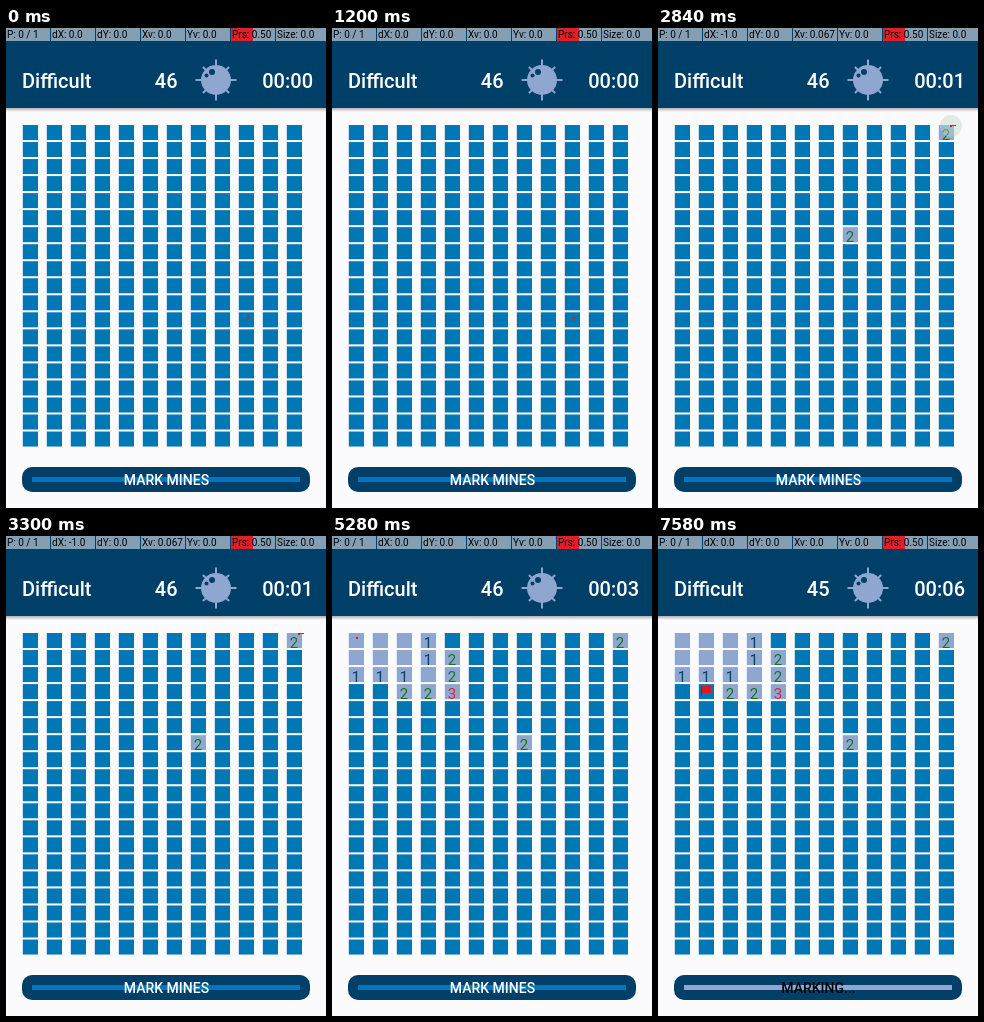
An HTML page with a canvas for the animation above (8000 ms loop, 320 by 480 pixels).

```html
<!DOCTYPE html>
<html lang="en">
<head>
<meta charset="utf-8">
<title>Mine field</title>
<style>
html, body { margin: 0; width: 100%; height: 100%; overflow: hidden; background: #fbfbfd; }
canvas { display: block; width: 100%; height: 100%; }
</style>
</head>
<body>
<canvas id="stage" width="320" height="480"></canvas>
<script>
const ctx = document.getElementById('stage').getContext('2d');
const LOOP = 8000, COLS = 12, ROWS = 19;
const NAVY = '#004068', BLUE = '#0277b5', GRAY = '#8fa6d0', PAPER = '#fbfbfd';
const DIGIT_COLORS = { 1: '#003f68', 2: '#14781c', 3: '#d02c38' };

// '.' is an opened empty cell, '#' a covered one.
const CORNER = ['...1#', '...12', '111.2', '##223'];

// Each tap moves the pointer; its touch spot stays until `end`.
const TAPS = [
  { start: -1000, end: -500, x: 242, y: 290 },
  { start: 1360, end: 1690, x: 207, y: 206 },
  { start: 2800, end: 3300, x: 293, y: 98, drag: 5 },
  { start: 3830, end: 4330, x: 25.5, y: 102 },
  { start: 5730, end: 6310, x: 134, y: 449 },
  { start: 7290, end: 7580, x: 48, y: 153 }
];
const CLOCK = [[2800, 1], [3830, 2], [5280, 3], [5730, 4], [7290, 6]];

const lastBefore = (list, test) => list.filter(test).pop();

function rect(color, x, y, w, h) {
  ctx.fillStyle = color;
  ctx.fillRect(x, y, w, h);
}

function disc(color, x, y, r) {
  ctx.fillStyle = color;
  ctx.beginPath();
  ctx.arc(x, y, r, 0, Math.PI * 2);
  ctx.fill();
}

function text(str, x, y, size, color, align = 'left', weight = 400) {
  ctx.font = `${weight} ${size}px Roboto, sans-serif`;
  ctx.textAlign = align;
  ctx.fillStyle = color;
  ctx.fillText(str, x, y);
}

function drawMine(x, y) {
  ctx.strokeStyle = GRAY;
  ctx.lineWidth = 2;
  for (let i = 0; i < 8; i++) {
    const angle = i * Math.PI / 4, reach = i % 2 ? 18.5 : 20.5;
    ctx.beginPath();
    ctx.moveTo(x, y);
    ctx.lineTo(x + reach * Math.cos(angle), y + reach * Math.sin(angle));
    ctx.stroke();
  }
  disc(GRAY, x, y, 15);
  disc(NAVY, x - 4, y - 8, 3);
  disc(NAVY, x - 9.5, y - 4.5, 2);
}

function drawHeader(t) {
  const shadow = ctx.createLinearGradient(0, 80, 0, 84);
  shadow.addColorStop(0, 'rgba(0,0,0,.3)');
  shadow.addColorStop(1, 'rgba(0,0,0,0)');
  rect(shadow, 0, 80, 320, 4);
  rect(NAVY, 0, 0, 320, 80);

  const tick = lastBefore(CLOCK, ([at]) => t >= at);
  const seconds = tick ? tick[1] : 0;
  text('Difficult', 16, 60, 20, '#fff', 'left', 500);
  text(t < 7290 ? '46' : '45', 171.5, 60, 20, '#fff', 'right', 500);
  text(`00:0${seconds}`, 307, 60, 20, '#fff', 'right', 500);
  drawMine(210, 52);
}

function drawPointerBar(tap) {
  rect('#849fb4', 0, 0, 320, 13);
  rect('#e02028', 225, 0, 22, 13);
  const labels = [
    'P: 0 / 1', tap.drag ? 'dX: -1.0' : 'dX: 0.0', 'dY: 0.0',
    tap.drag ? 'Xv: 0.067' : 'Xv: 0.0', 'Yv: 0.0', 'Prs: 0.50', 'Size: 0.0'
  ];
  labels.forEach((label, i) => {
    if (i) rect(NAVY, i * 45 - 1, 0, 1, 13);
    text(label, i * 45 + 1, 10, 10, '#000');
  });
}

function cellAt(col, row, t) {
  if (t >= 1360 && col === 7 && row === 6) return '2';
  if (t >= 2800 && col === 11 && row === 0) return '2';
  if (t >= 3830) return CORNER[row]?.[col] ?? '#';
  return '#';
}

function drawBoard(t) {
  for (let row = 0; row < ROWS; row++) {
    for (let col = 0; col < COLS; col++) {
      const x = 16.8 + col * 24, y = 97 + row * 17.03;
      const cell = cellAt(col, row, t);
      rect(cell === '#' ? BLUE : GRAY, x, y, 15.2, 15);
      if (DIGIT_COLORS[cell]) text(cell, x + 7.2, y + 15, 15, DIGIT_COLORS[cell], 'center');
    }
  }
  if (t >= 7290) {
    rect('#d81c1c', 43, 150, 10, 7);
    rect('#8c1c24', 43, 150, 1, 10);
  }
}

function drawButton(marking) {
  ctx.fillStyle = NAVY;
  ctx.beginPath();
  ctx.roundRect(16, 439, 288, 25, 10);
  ctx.fill();
  rect(marking ? GRAY : BLUE, 26, 449, 268, 5);
  text(marking ? 'MARKING...' : 'MARK MINES', 160.5, 457, 14, marking ? '#000' : '#fff', 'center', 500);
}

function drawPointer(tap, t) {
  if (t < tap.end) {
    const fade = Math.max(0.06, 0.5 * (1 - (t - tap.start) / 400));
    disc(`rgba(190,215,190,${fade})`, tap.x, tap.y, 11);
  }
  if (tap.drag) rect('#b0207c', tap.x, tap.y - 1, tap.drag, 1);
  rect('#d8200c', Math.floor(tap.x) - 1, tap.y - 1, 2, 2);
}

function draw(t) {
  const tap = lastBefore(TAPS, ({ start }) => t >= start);
  rect(PAPER, 0, 0, 320, 480);
  drawHeader(t);
  drawBoard(t);
  drawButton(t >= 5730);
  drawPointer(tap, t);
  drawPointerBar(tap);
}

function frame() {
  draw(performance.now() % LOOP);
  requestAnimationFrame(frame);
}
frame();
</script>
</body>
</html>
```
